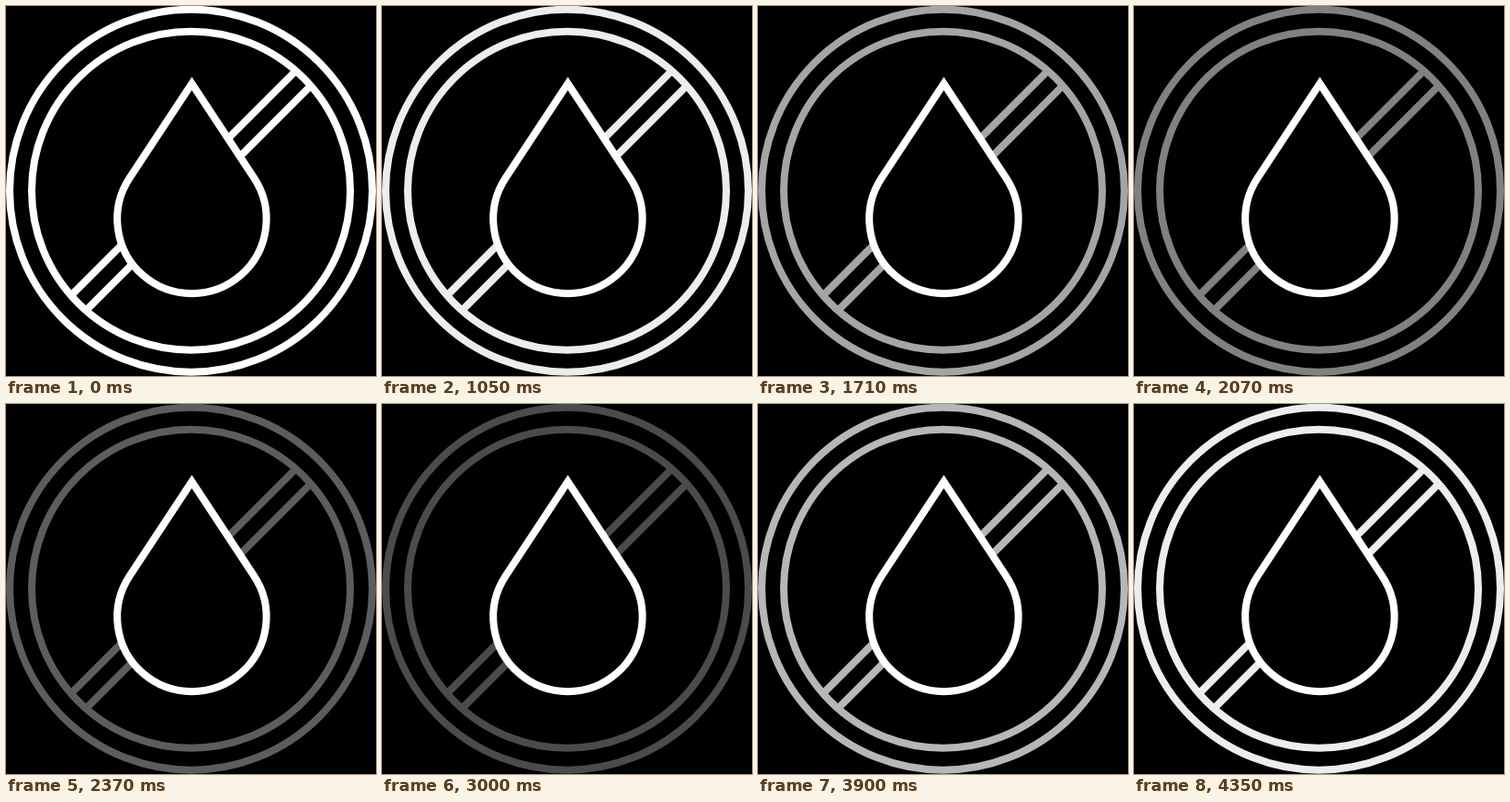
Recreate the animation shown at these times as an HTML page. Size 403 by 403 pixels, loop 4500 ms.

```html
<!DOCTYPE html>
<html lang="en">
<head>
<meta charset="utf-8">
<title>Drop sign</title>
<style>
  html, body { margin: 0; width: 100%; height: 100%; overflow: hidden; background: #000; }
  svg { display: block; width: 100%; height: 100%; }
  svg * { stroke-width: 8; }
  #sign { fill: none; stroke: #fff; }
  #drop { fill: #000; stroke: #fff; stroke-miterlimit: 10; }
</style>
</head>
<body>
<svg viewBox="0 0 403 403">
  <g id="sign">
    <circle cx="201.5" cy="201.2" r="197.5"/>
    <circle cx="201.5" cy="201.2" r="173.5"/>
    <g transform="translate(201.3 201.2) rotate(-45)">
      <path d="M-173 -11.5H173M-173 11.5H173"/>
    </g>
  </g>
  <path id="drop" d="M202.4 84.5L270 187A81.2 81.2 0 1 1 134.8 187Z"/>
</svg>
<script>
  const LOOP = 4500;
  const STEP = 18; // grey levels per change
  const fadeOut = [1050, 1230, 1410, 1560, 1710, 1890, 2070, 2220, 2370, 2550, 2730];
  const fadeIn = Array.from({ length: 10 }, (_, i) => 3000 + i * 150);

  const grey = level => `rgb(${level}, ${level}, ${level})`;
  const hold = (time, level) => ({ offset: time / LOOP, stroke: grey(level), easing: 'step-end' });
  const lowest = 255 - STEP * fadeOut.length;

  document.getElementById('sign').animate([
    hold(0, 255),
    ...fadeOut.map((t, i) => hold(t, 255 - STEP * (i + 1))),
    ...fadeIn.map((t, i) => hold(t, lowest + STEP * (i + 1))),
    hold(LOOP, 255)
  ], { duration: LOOP, iterations: Infinity });
</script>
</body>
</html>
```
